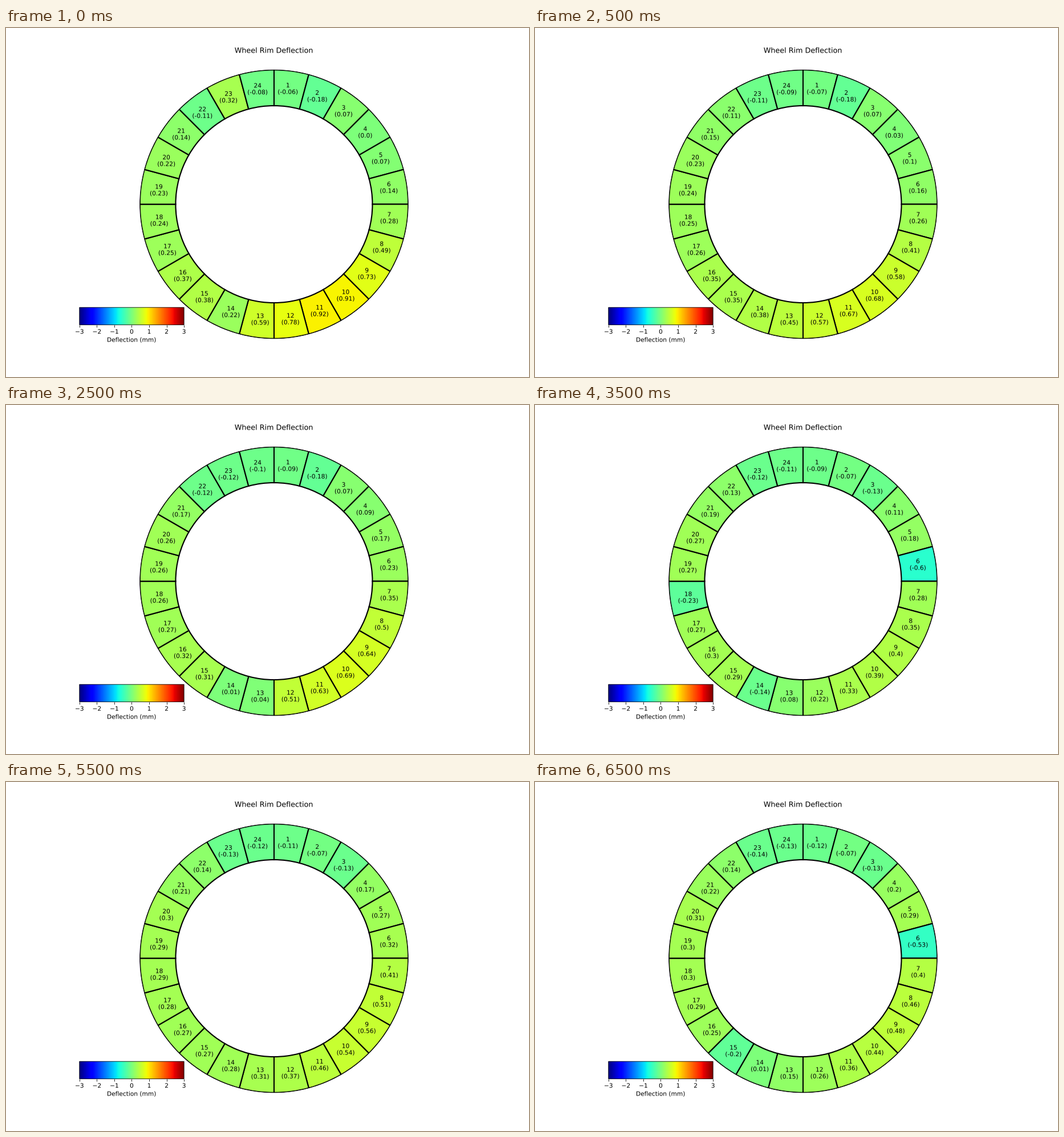
Write a matplotlib script that moves like this. It is 917 by 611 pixels and loops after 8000 ms.

```python
import numpy as np
import matplotlib.pyplot as plt
from matplotlib.animation import FuncAnimation
from matplotlib.cm import ScalarMappable
from matplotlib.colors import Normalize
from matplotlib.patheffects import Normal
from matplotlib.text import Text

W, H, DPI = 917, 611, 100
PT = 0.764  # drawn as a 12 x 8 inch layout

plt.rcParams.update({
    "font.family": "DejaVu Sans",
    "font.size": 10 * PT,
    "axes.linewidth": 0.8 * PT,
    "axes.labelpad": 4 * PT,
    "xtick.major.size": 3.5 * PT,
    "xtick.major.width": 0.8 * PT,
    "xtick.major.pad": 3.5 * PT,
})

N, STATES = 24, 8
R_IN, R_TEXT, R_OUT = 11, 12.97, 15
TEXT_SHIFT = 0.011
seg = np.arange(1, N + 1)

# Slow drift of the rim: (segment, first value, last value)
knots, first, last = np.transpose([
    (1, -.06, -.12), (2, -.06, -.07), (3, .07, .07), (4, 0, .19),
    (5, .05, .26), (16, .36, .25), (17, .25, .29), (20, .22, .31),
    (21, .14, .22), (22, .11, .14), (23, -.10, -.14),
])
# Height of the bulge on the lower right in each state
bulge = [.73, .48, .27, .47, .21, .42, .32, .24]
# Local loads by state: (segment, depth, share passed on to the one before)
loads = {
    0: [(14, -.23, 0), (22, -.22, 0), (23, .42, 0)],
    2: [(6, -.93, 0), (15, -.38, .55)],
    3: [(13, -.36, 0), (14, -.32, 0), (22, -.24, 0)],
    4: [(6, -.82, 0), (14, -.43, .55), (18, -.5, 0)],
    5: [(8, -.34, 0), (15, -.42, 0)],
    7: [(6, -.86, 0), (15, -.45, .55)],
}


def deflection(state):
    p = state / (STATES - 1)
    v = np.interp(seg, knots, first + (last - first) * p, period=N)
    v += bulge[state] * np.exp(-(seg - 10.4 + 0.2 * state) ** 2 / 8)
    notch = (2, -.12, 0) if state < 4 else (3, -.2, 0)
    for at, depth, share in [notch, *loads.get(state, [])]:
        before = seg <= at
        v[before] += depth * float(share) ** (at - seg[before])
    return v


norm = Normalize(-3, 3)
cmap = plt.get_cmap("jet")

fig = plt.figure(figsize=(W / DPI, H / DPI), dpi=DPI, facecolor="white")
ax = fig.add_axes([0.125, 0.11, 0.775, 0.77], projection="polar")
ax.set_theta_zero_location("N")
ax.set_theta_direction(-1)

step = 2 * np.pi / N
mid = (seg - 0.5) * step
bars = ax.bar(mid, R_OUT - R_IN, width=step, bottom=R_IN,
              edgecolor="black", linewidth=2 * PT)
labels = [ax.text(t - TEXT_SHIFT, R_TEXT, "", ha="center", va="center")
          for t in mid]
ax.set_ylim(0, R_OUT)
ax.set_xticks([])
ax.set_yticks([])
ax.grid(False)

fig.text(0.5125, 1 - 43.5 / H, "Wheel Rim Deflection",
         size=12 * PT, ha="center", va="baseline")

cax = fig.add_axes([168.5 / 1200, 119.5 / 800, 0.2, 0.05])
bar_key = fig.colorbar(ScalarMappable(norm, cmap), cax=cax,
                       orientation="horizontal", ticks=range(-3, 4),
                       label="Deflection (mm)")
bar_key.outline.set_snap(False)

# Draw text as outlines, so it is not rounded to whole pixels
for text in fig.findobj(Text):
    text.set_path_effects([Normal()])


def update(frame):
    # First state lasts one tick, the last three, all others two
    values = deflection(min((frame + 1) // 2, STATES - 1))
    for i, bar, label, v in zip(seg, bars, labels, values):
        bar.set_facecolor(cmap(norm(v)))
        label.set_text(f"{i}\n({round(float(v), 2) + 0.0})")
    return [*bars, *labels]


anim = FuncAnimation(fig, update, frames=16, interval=500, repeat=True)
plt.show()
```
